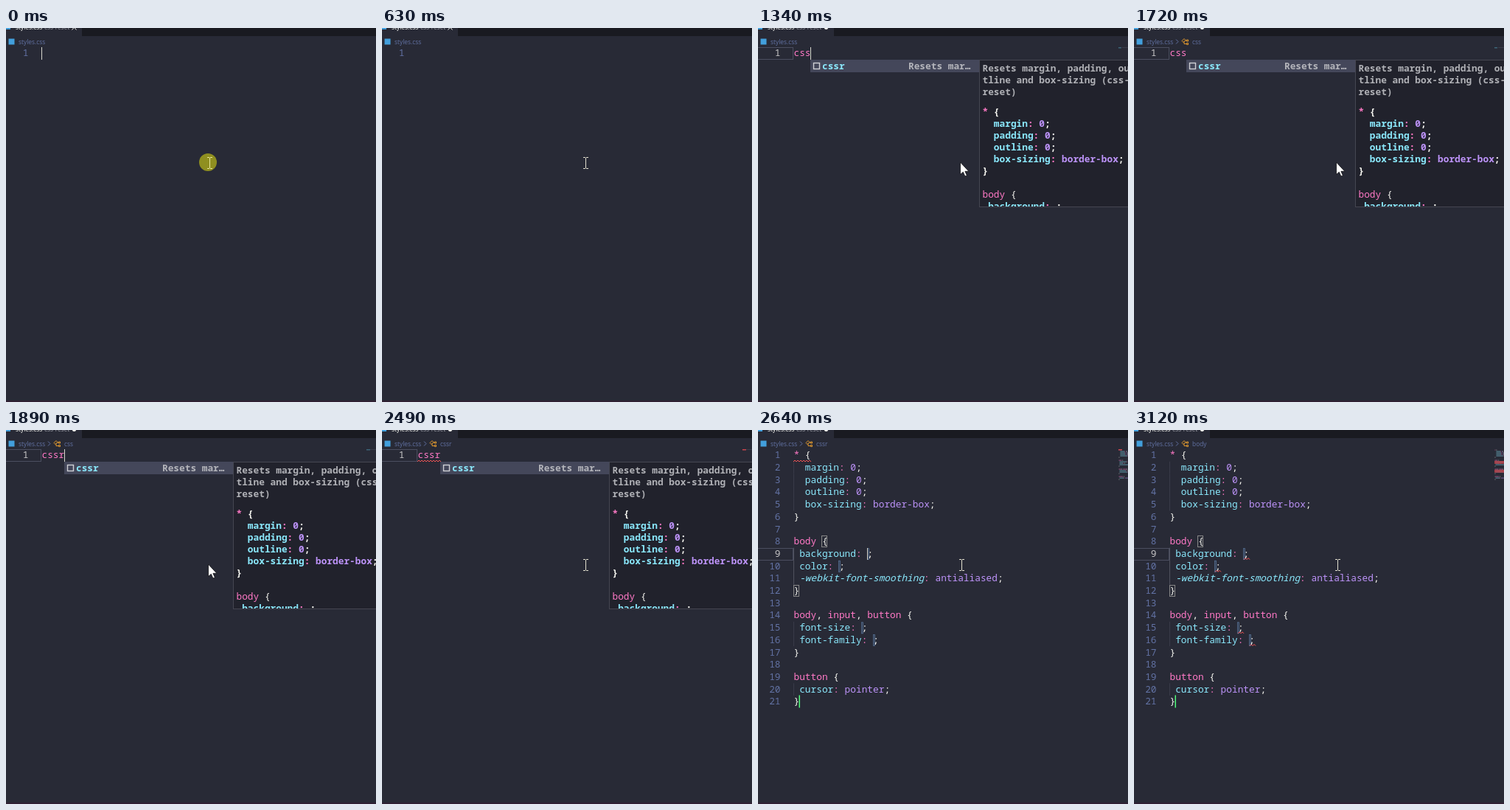
These frames come from a looping animation (502 by 507 pixels, 3180 ms). An HTML page:

```html
<!DOCTYPE html>
<html lang="en">
<head>
<meta charset="utf-8">
<title>CSS reset snippet</title>
<style>
  html, body { margin: 0; width: 100%; height: 100%; overflow: hidden; background: #282a36; }
  svg { display: block; width: 502px; height: 507px; }
  .code { font: 500 12.8px "Noto Sans Mono", "DejaVu Sans Mono", monospace; font-variant-ligatures: none; }
  .bold { font-weight: 600; }
  .ui { font: 8.4px "Open Sans", "Noto Sans", sans-serif; }
</style>
</head>
<body>
<svg id="stage" viewBox="0 0 502 507"></svg>
<script>
const LOOP = 3180, CHAR = 7.68, LINE = 16.7, LEFT = 48.5, TOP = 26;
const FG = '#f8f8f2', PINK = '#ff79c6', CYAN = '#8be9fd', PURPLE = '#bd93f9',
      MUTED = '#6272a4', RED = '#ff5555', BLUE = '#429fdc', BG = '#282a36';

const SNIPPET = `* {
  margin: 0;
  padding: 0;
  outline: 0;
  box-sizing: border-box;
}

body {
 background: ;
 color: ;
 -webkit-font-smoothing: antialiased;
}

body, input, button {
 font-size: ;
 font-family: ;
}

button {
 cursor: pointer;
}`.split('\n');

const stage = document.getElementById('stage');
const rect = (x, y, w, h, fill, more = '') =>
  `<rect x="${x}" y="${y}" width="${w}" height="${h}" fill="${fill}" ${more}/>`;
const outline = (x, y, w, h, color) =>
  rect(x + .5, y + .5, w - 1, h - 1, 'none', `stroke="${color}"`);
const path = (d, stroke, more = 'fill="none"') => `<path d="${d}" stroke="${stroke}" ${more}/>`;
const text = (x, y, content, fill, cls = 'code', more = '') =>
  `<text x="${x}" y="${y}" class="${cls}" fill="${fill}" ${more}>${content}</text>`;

const lineTop = row => TOP + row * LINE;
const baseline = row => 38.3 + row * LINE;
const column = col => LEFT + col * CHAR;
const indentOf = line => line.search(/\S|$/);

// Splits a line of CSS into [text, color, italic] parts.
function tokens(line) {
  const code = line.trim();
  const rule = code.match(/^([\w-]+)(:)( .*)(;)$/);
  if (rule) {
    const [, name, colon, value, end] = rule;
    return [[name, CYAN, name[0] === '-'], [colon, PINK], [value, PURPLE], [end, FG]];
  }
  return code.split(/(\w+|\*)/).filter(Boolean)
    .map(part => [part, /[\w*]/.test(part) ? PINK : FG]);
}

function codeLine(line, x, y, plain, cls = 'code') {
  const spans = tokens(line).map(([part, color, italic]) =>
    `<tspan fill="${plain ? FG : color}"${italic && !plain ? ' font-style="italic"' : ''}>${part}</tspan>`);
  return text(x + indentOf(line) * CHAR, y, spans.join(''), FG, cls);
}

function squiggle(x, y, width) {
  let d = `M${x} ${y}`;
  for (let i = 0; i + 4 <= width; i += 4) d += 'l2-2l2 2';
  return path(d, RED);
}

function gutterBox(row) {
  const y = Math.round(lineTop(row));
  return outline(-1, y, 49, 17, '#4b4e60');
}

function header(t) {
  const dirty = t >= 930;
  const crumb = t < 1660 ? '' : t < 2180 ? 'css' : t < 2800 ? 'cssr' : 'body';
  let out = rect(0, 0, 502, 11, '#191a21') + rect(0, 0, 103, 11, BG)
    + rect(-2, -6, 8, 8, BLUE)
    + text(13, 2.4, 'styles.css', FG, 'ui')
    + text(52, 2.4, 'css-reset', '#9a9ca6', 'ui')
    + (dirty ? `<circle cx="92.5" cy="-.6" r="2.7" fill="${FG}"/>`
             : path('M89.5-4l6 6.5m0-6.5l-6 6.5', FG))
    + rect(3.5, 14.5, 8, 8, BLUE)
    + text(17, 22, 'styles.css', MUTED, 'ui');
  if (crumb) {
    out += path('M57 15.5l3 3-3 3', MUTED)
      + path('M65 17.5l3-3 2 2-3 3zM69 17h2.5M68 18v3.5h3.5M71.5 16h2v2h-2zM71.5 20.5h2v2h-2z', '#e0982e')
      + text(79, 22, crumb, MUTED, 'ui');
  }
  return out;
}

function suggestions(x) {
  const docs = x + 229, docX = docs + 4.5;
  let out = rect(x, 43, 229, 17, '#44475a')
    + rect(x + 4.5, 47.5, 8, 8, 'none', 'stroke="#d0d1d6" stroke-width="1.4"')
    + text(x + 16, 56, 'cssr', CYAN, 'code bold')
    + text(x + 133, 56, 'Resets mar…', '#b4b5bb', 'code bold')
    + rect(docs + .5, 43.5, 300, 199, '#21222c', 'stroke="#454651"');
  ['Resets margin, padding, ou', 'tline and box-sizing (css-', 'reset)'].forEach((line, i) =>
    out += text(docX, 59 + i * 16, line, '#b0b1b6', 'code bold'));
  const preview = SNIPPET.slice(0, 9).map((line, i) =>
    codeLine(line, docX, 118 + i * 16, false, i === 7 ? 'code' : 'code bold')).join('');
  return out + `<g clip-path="url(#docs)">${preview}</g>`;
}

function typing(t) {
  const word = t < 860 ? '' : t < 1100 ? 'c' : t < 1340 ? 'cs' : t < 1890 ? 'css' : 'cssr';
  const invalid = t >= 2000;
  let out = word ? gutterBox(0) : '';
  out += text(30.5, baseline(0), 1, word ? '#c6c6c6' : MUTED, 'code', 'text-anchor="end"')
    + text(LEFT, baseline(0), word, PINK);
  if (invalid) out += squiggle(48, 43, 32);
  if (t >= 930) {
    out += rect(494, 26, 8, 1, '#3a3c4a')
      + rect(489, 26, word.length + 1, 1.5, invalid ? '#c8454c' : '#3c6578');
  }
  if (t >= 1340) out += suggestions(Math.round(column(word.length)) - (word.length === 3 ? 1 : 0));
  return out;
}

function minimap(plainFrom) {
  return SNIPPET.map((line, row) => {
    let col = indentOf(line);
    return tokens(line).map(([part, color]) => {
      const x = 489.5 + (col + indentOf(part)) * .95;
      col += part.length;
      return rect(x, 26.5 + row * 2, part.trim().length * .95, 1.2,
        row >= plainFrom ? FG : color, 'opacity=".45"');
    }).join('');
  }).join('');
}

function document_(t) {
  const plainFrom = t < 2640 ? 8 : Infinity;
  const checked = t >= 3120;
  let out = gutterBox(8) + minimap(plainFrom);
  SNIPPET.forEach((line, row) => {
    const y = lineTop(row);
    if (line[0] === ' ') {
      out += rect(48, y, 1, LINE, row > 7 && row < 11 ? '#50525e' : '#393b48');
    }
    if (line.endsWith(': ;')) {
      const x = Math.floor(column(line.length - 1));
      out += rect(x + .5, y + 1, 2, 15, '#343d50', 'stroke="#557095" stroke-width=".8"');
      if (checked) {
        out += squiggle(x + 1, y + 16, 8) + rect(489, 26 + row * 2, 13, 1.6, '#b9424b');
      }
    }
    out += text(30.5, baseline(row), row + 1, row === 8 ? '#c6c6c6' : MUTED, 'code', 'text-anchor="end"')
      + codeLine(line, LEFT, baseline(row), row >= plainFrom);
  });
  out += outline(86, 143, 8, 16, '#888888') + outline(48, 210, 8, 16, '#888888')
    + rect(55.5, 359.5, 1.5, 17, '#50fa7b');
  if (!checked) out += squiggle(48, 43, 24) + rect(489, 26, 5, 1.5, '#c8454c');
  return out;
}

function caret(t) {
  const [x, y] = t < 860 ? [48, 26] : t < 1100 ? [56, 26] : t < 1340 ? [63, 26]
    : t < 1890 ? [71, 26] : t < 2570 ? [79, 26] : [148, 160];
  const visible = [[0, 630], [860, 1720], [1890, 2260], [2570, 2950]]
    .some(([on, off]) => t >= on && t < off);
  return visible ? rect(x, y, 1, y === 26 ? 17 : 16, '#d6d6cc') : '';
}

function pointer(t) {
  if (t >= 1250 && t < 2490) {
    return path('M274.5 182v16.6l3.8-3.4 2.6 5.8 2.5-1.1-2.5-5.6h5z', '#101014', 'fill="#fff" stroke-width=".8"');
  }
  const click = t < 150 ? '<circle cx="274" cy="182" r="12" fill="#8f8f20"/>' : '';
  const color = t < 150 ? '#e8e69a' : '#e2dfcf';
  return click + path('M273 175.5h3m1 0h3M276.5 176v14M273 190.5h3m1 0h3', color);
}

function scene(t) {
  return '<clipPath id="docs"><rect y="44" width="502" height="198"/></clipPath>'
    + rect(0, 0, 502, 507, BG) + rect(0, 505, 502, 2, '#2f2033')
    + header(t) + (t < 2570 ? typing(t) : document_(t)) + caret(t) + pointer(t);
}

let shown = '';
function play() {
  const next = scene(performance.now() % LOOP);
  if (next !== shown) stage.innerHTML = shown = next;
  requestAnimationFrame(play);
}
play();
</script>
</body>
</html>
```
